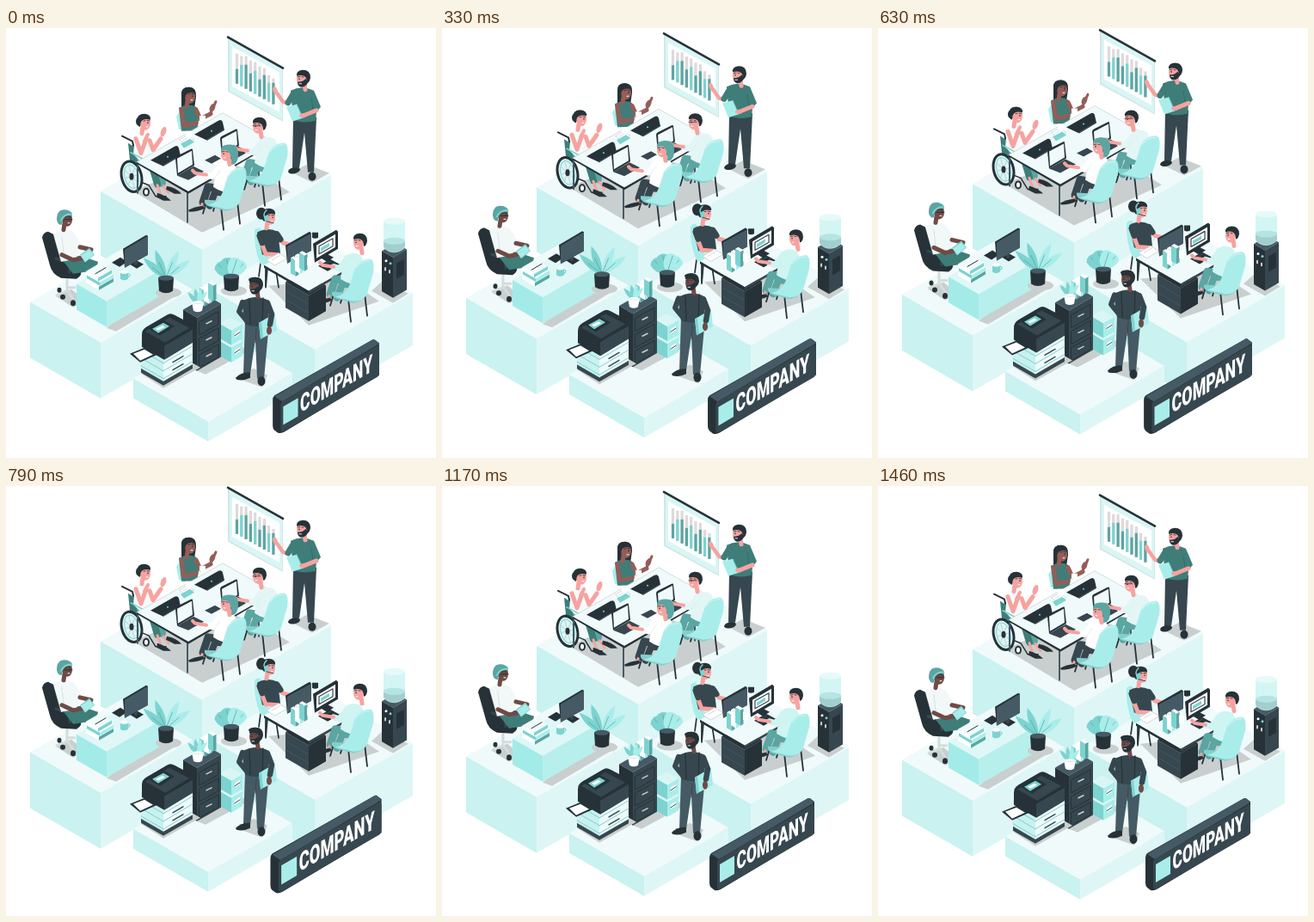
Recreate the animation shown at these times as an HTML page. Size 500 by 500 pixels, loop 1500 ms.

```html
<!DOCTYPE html>
<html lang="en">
<head>
<meta charset="utf-8">
<title>Isometric office</title>
<style>
html, body { margin: 0; width: 100%; height: 100%; overflow: hidden; background: #fff; }
svg { display: block; width: 100vw; height: 100vh; }
text { font: 900 28px Roboto, sans-serif; fill: #fff; }
</style>
</head>
<body>
<svg viewBox="0 0 500 500"><g id="office"></g><g id="sign"></g></svg>
<script>
const dark = '#263238', slate = '#37474f', grey = '#455a64', aqua = '#a9edeb', teal = '#7cd3d0',
  deep = '#5ba5a2', green = '#3f7d79', pale = '#d9f6f5', mist = '#f0fafa', white = '#fff',
  pink = '#f6a3a0', brown = '#955d58', umber = '#704a46', shade = '#c9cfcf';

const fill = (color, d) => `<path fill="${color}" d="${d}"/>`;
const line = (color, width, d, cap = 'round') =>
  `<path fill="none" stroke="${color}" stroke-width="${width}" stroke-linecap="${cap}" stroke-linejoin="round" d="${d}"/>`;
const oval = (color, x, y, rx, ry = rx, turn = 0) =>
  `<ellipse fill="${color}" rx="${rx}" ry="${ry}" transform="translate(${x} ${y}) rotate(${turn})"/>`;
const at = (x, y, content, flip = 1) => `<g transform="translate(${x} ${y}) scale(${flip} 1)">${content}</g>`;
const fan = (turns, draw) => turns.map((turn, i) => `<g transform="rotate(${turn})">${draw(i)}</g>`).join('');

// Isometric box: (x, y) is the front corner of its top, a and b reach left and right.
function box(x, y, a, b, h, [top, left, right]) {
  const k = 0.577, l = y - a * k, r = y - b * k;
  return fill(top, `M${x} ${y}L${x - a} ${l} ${x + b - a} ${l - b * k} ${x + b} ${r}Z`) +
    fill(left, `M${x} ${y}L${x - a} ${l}v${h}L${x} ${y + h}Z`) +
    fill(right, `M${x} ${y}L${x + b} ${r}v${h}L${x} ${y + h}Z`);
}

const blockColors = [mist, '#c9f2f0', '#def7f6'], darkBox = [grey, dark, slate];

// Head looking left; flip = -1 looks right.
const head = (x, y, skin, hair, flip = 1, extra = '') => at(x, y,
  line(skin, 5, 'M2 5L3 12') + oval(skin, -1, 0, 6, 8) +
  fill(hair, 'M-7 -4Q-8 -10 0 -11Q9 -11 9 -2Q8 4 5 4Q5 -1 3 -3Q0 -6 -7 -4Z') +
  oval(dark, -4, -.5, .8) + line(dark, .8, 'M-6 -2.8l3 -.4M-1 -3l2 .3') + line(white, 1, 'M-4 4h2'), flip) +
  at(x, y, extra, flip);

const beard = fill(dark, 'M-6 3Q-3 3 0 2L4 -1 6 4Q3 9 -2 9Q-6 8 -6 3Z') + line(white, .9, 'M-4 5h2.5');

const chair = line(dark, 1.8, 'M233 203L229 216M250 208L253 235M269 202L272 228M243 206L241 213') +
  fill('#84cfcd', 'M231 200Q230 206 237 208L256 213Q268 211 271 202Z') +
  fill(aqua, 'M258 172Q265 161 276 162Q281 164 279 178L272 202Q268 211 256 211L235 206Q248 203 252 191Z') +
  line('#c9f5f3', 1.2, 'M259 172Q266 163 275 164');

// A person seated at the right of a table, looking left, with the chair in front.
const seated = (dx, dy, shirt, trousers, face) => at(dx, dy,
  line(trousers, 9, 'M254 188L235 185L229 203') + line(trousers, 8, 'M257 192L243 191L237 207') +
  line(pink, 3, 'M228 205L227 210') +
  fill(dark, 'M212 212Q219 208 229 207L231 210Q223 214 213 214Z') +
  fill(shirt, 'M245 160Q253 152 264 157Q270 164 267 178L263 192Q251 192 241 185Z') +
  line(shirt, 7, 'M247 164L240 173L233 171') + line(pink, 4, 'M233 171L220 169L217 166') +
  line('#dcebeb', .8, 'M249 166L242 176')) + face + at(dx, dy, chair);

const openLaptop = fill(slate, 'M199 172L218 161 230 167 212 177Z') +
  fill(dark, 'M197 152Q197 150 199 149L215 141Q217 140 217 142L219 160 199 172Z') +
  fill(mist, 'M199 152L216 143 217 159 200 169Z');
const laptopLid = fill(dark, 'M168 154L196 138Q200 136 201 140L203 149 183 161Z') +
  line(grey, 1, 'M183 160L202 149') + oval(teal, 188, 150, 1);

function chart() {
  const tall = [35, 35, 38, 36, 37, 35, 36, 31, 30], low = [17, 25, 28, 21, 27, 20, 28, 22, 25];
  let bars = '';
  tall.forEach((h, i) => {
    const foot = `M${268.5 + 5.3 * i} ${65 + 3 * i}v-`;
    bars += line('#dfd9da', 3.2, foot + h, 'butt') + line(i % 3 == 1 ? teal : deep, 3.2, foot + low[i], 'butt');
  });
  return fill('#d0e7e7', 'M258 12L322 48V109L258 74Z') + fill(pale, 'M260 14L321 48V107L260 73Z') +
    fill(white, 'M263 22L318 52V98L263 68Z') + bars + line(dark, 2.6, 'M258 11L322 47');
}

const presenter = fill(shade, 'M332 168L356 180 376 169 350 159Z') +
  fill(slate, 'M334 104H361L358 168H351L347 122 341 163H333Z') +
  oval(dark, 335, 166, 7, 3.5, -12) + oval(dark, 356, 173, 4.5, 5) +
  line(pink, 4.5, 'M328 88L322 86L315 76') + oval(pink, 313, 73, 2.5, 4.5, -20) +
  line(green, 7, 'M334 77L328 87') +
  fill(green, 'M331 73Q344 66 358 73L366 92 361 98 360 108Q346 112 334 107Z') +
  line(pink, 5, 'M361 96L346 102') + line('#356b68', 1, 'M355 82L357 94') +
  fill(aqua, 'M326 92L338 89 345 105 333 109Z') + line(teal, 1, 'M338 89L345 105') + oval(pink, 345, 102, 4, 2.5) +
  head(345, 60, pink, dark, 1, beard);

const talker = fill(aqua, 'M198 103L204 94 208 120 201 118Z') +
  fill(dark, 'M204 78Q203 69 213 69Q222 70 221 80L219 94 204 96Z') +
  fill(green, 'M201 93Q212 87 221 92L224 108 222 120H204Z') +
  line(brown, 5, 'M221 95L226 106L238 100') + line(brown, 3, 'M238 99L244 86') + oval(brown, 240, 93, 3, 5, 25) +
  line(brown, 5, 'M204 95L207 114L221 111') + head(213, 80, brown, dark, -1);

const wheelchairUser = line(dark, 2, 'M135 126L147 132L153 160') + fill(green, 'M142 134L153 141 156 160 144 154Z') +
  line(deep, 10, 'M157 152L176 160L181 180') + line(green, 8, 'M161 157L170 162L176 182') +
  line(pink, 3, 'M183 184L189 192M176 183L180 194') +
  fill(dark, 'M187 184Q198 186 204 193L196 193 186 188ZM176 192Q186 195 192 201L183 201 175 197Z') +
  line(dark, 1.5, 'M153 178L166 183L174 196L186 196') + oval(dark, 163, 191, 4, 5) + oval(white, 163, 191, 2, 3) +
  fill('#f5fafa', 'M150 126Q160 120 168 126L170 150 156 155 148 147Z') +
  line(pink, 5, 'M151 129L157 146L163 129M167 131L171 142L180 129') + oval(pink, 183, 121, 3, 6, 20) +
  oval(dark, 155, 109, 4, 5) + head(161, 111, pink, dark, -1) + line(pink, 4, 'M161 132L165 124') +
  `<g fill="none" stroke="${dark}" transform="translate(146 173) rotate(-14)"><ellipse fill="${pale}" stroke-width="3" rx="11.5" ry="18"/>
  <ellipse stroke="${teal}" rx="8" ry="14"/><path stroke="${shade}" d="M-8 0H8M0 -14V14M-6 -9L6 9M6 -9L-6 9"/></g>` +
  oval(dark, 146, 173, 2.5, 4) + line(teal, 1.5, 'M145 145L160 153');

const table = line(grey, 2, 'M153 158V192M211 192V226M294 150V184') +
  fill(dark, 'M152 156L212 190 311 133V135L212 193 152 158Z') +
  fill(mist, 'M152 156L252 99L312 133 212 190Z') + line(shade, .7, 'M152 156L252 99L312 133') +
  laptopLid + at(51, -30, laptopLid) +
  fill(white, 'M202 130L211 125 219 130 209 136ZM232 153L243 147 254 153 244 160Z') +
  line(shade, .7, 'M202 130L211 125L219 130L209 136ZM206 131l8 -5') +
  fill(teal, 'M203 135L214 129 219 133 207 140Z') + fill(white, 'M209 120h7v7q-4 2 -7 0ZM225 102h7v6q-4 2 -7 0Z') +
  fill(slate, 'M231 154L243 148 250 152 239 158Z') +
  at(52, -23, openLaptop);

const meeting = chart() + presenter + talker +
  fill(shade, 'M148 190L228 238 330 191 300 172 240 150Z') + wheelchairUser + table +
  seated(48, -28, '#e2f6f5', deep, head(294, 115, pink, dark, 1, line(dark, .8, 'M-7 -1h9'))) + openLaptop +
  seated(0, 0, white, slate, head(257, 147, pink, deep, 1, fill(deep, 'M0 -11Q14 -13 13 2Q12 13 5 12Q6 2 1 -4Z')));

const longLeaf = 'M0 0Q-8 -17 2 -35Q9 -16 0 0Z', roundLeaf = 'M0 0Q-11 -6 -7 -20Q-1 -25 6 -20Q9 -7 0 0Z';
const plant = (x, y, leaf, turns) => oval(shade, x + 3, y + 17, 15, 6) + at(x, y,
  fan(turns, i => fill(i % 2 ? aqua : teal, leaf) + line(deep, .7, 'M0 0V-20')) +
  fill(dark, 'M-9 0Q0 -5 9 0L8 15Q0 20 -8 15Z') + oval(grey, 0, 0, 9, 3));

const books = (x, y) => [0, 1, 2].map(i =>
  box(x + i * 5, y - i * 3, 6, 3.5, 18, [white, i % 2 ? white : teal, i % 2 ? aqua : deep])).join('');

const manager = fill(shade, 'M58 312L78 325 92 317 76 304ZM117 349L128 353 202 309 181 297Z') +
  line('#d5dcdc', 3, 'M71 289V306L59 311M71 305L79 317M71 302L80 302') +
  oval(dark, 62, 305, 2.5, 3) + oval(dark, 66, 313, 3) + oval(dark, 78, 320, 3, 3.5) +
  fill(dark, 'M42 244Q43 238 49 237L57 241 66 272 86 281Q90 287 82 292L64 291Q53 286 51 276Z') +
  line(grey, 1, 'M56 243L64 272') + line(slate, 3, 'M58 268L74 274V284') +
  fill(green, 'M64 268L86 265 107 272Q106 281 92 284L78 286Z') +
  fill('#f2f7f7', 'M55 240Q67 231 79 238L89 255 81 269 64 272Z') + line('#d6e4e4', 1, 'M65 243L67 262') +
  line(umber, 5, 'M65 264L78 270L88 268M86 255L99 258') +
  fill(teal, 'M86 264L97 256 103 264 92 273Z') + fill(aqua, 'M87 265L97 258 102 264 92 272Z') +
  head(70, 223, umber, deep, -1, fill(deep, 'M-2 -11Q11 -14 11 0Q10 7 5 6Q5 -2 0 -5Z') +
    line(teal, 2, 'M-6 -6Q2 -7 6 1') + line(dark, 1, 'M-7 0h9')) +
  box(117, 318, 35, 64, 30, ['#dff7f6', '#a3ebe8', '#b7efed']) +
  box(108, 301, 15, 17, 4, [white, white, deep]) + box(109, 296, 15, 16, 4, [white, teal, aqua]) +
  box(107, 291, 14, 16, 4, [mist, white, teal]) + line(dark, 1, 'M104 286L116 279') +
  fill(teal, 'M133 284h9v8q-5 3 -9 0Z') + oval(white, 137.5, 284, 4.5, 2) + line(teal, 1.2, 'M142 286q4 1 0 4') +
  fill(dark, 'M123 273L133 267 141 272 132 278ZM144 275L151 270 160 275 152 280Z') + line(slate, 4, 'M151 265V274') +
  fill(dark, 'M136 257L163 241 165 242V264L138 279Z') + fill(grey, 'M138 258L165 242V264L138 279Z') +
  plant(186, 291, longLeaf, [-52, 50, -24, 22]);

const cooler = fill(shade, 'M425 306L450 320 468 309 437 295Z') + box(450, 267, 13, 16, 47, [grey, dark, slate]) +
  fill('#a9d5d4', 'M440 250V257Q451 266 463 257V250Z') +
  fill('#d3f6f4', 'M439 226Q451 218 464 226V254Q451 264 439 254Z') +
  fill('#a2cecd', 'M439 248Q451 255 464 248V255Q451 265 439 255Z') +
  oval('#b5e5e3', 451.5, 248, 12.5, 4) + oval('#e6faf9', 451.5, 225, 12.5, 4) +
  oval(white, 442, 271, 1.5) + oval(teal, 447, 274, 1.5) + line(white, 1.5, 'M441 279v3M446 282v3') + fill(dark, 'M454 274L463 269V287L454 292Z');

const operator = line(dark, 1.7, 'M296 274L294 289M304 279L302 302M313 276L317 302') +
  fill(aqua, 'M289 235Q296 228 299 240L304 266 320 272 310 279 296 275Q288 258 289 235Z') +
  fill(slate, 'M292 238Q304 231 316 237L319 262 298 264Z') +
  line(pink, 5, 'M295 245L302 263L316 264M316 241L322 250L336 254') + line(slate, 7, 'M295 242L298 250M315 240L319 246') +
  oval(dark, 297, 216, 6, 7) + head(306, 221, pink, dark, -1, line(teal, 1.5, 'M3 -9Q9 -4 3 3') + oval(teal, 3, 1, 2.5, 4) + line(dark, .8, 'M3 4L-5 6'));

const workstation = fill(shade, 'M305 300L352 346 434 318 395 292Z') + operator +
  line(dark, 1.8, 'M302 280V300M403 279V305') +
  box(352, 311, 27, 20, 30, [dark, slate, dark]) + line(grey, .8, 'M327 307L351 321M327 317L351 331') +
  box(352, 306, 52, 53, 3, [mist, dark, slate]) +
  fill(white, 'M303 270L317 262 327 268 313 276Z') + line(shade, .8, 'M303 270L317 262L327 268L313 276ZM309 270l9 -5') +
  line(slate, 4, 'M341 264V270M373 258V266') + fill(dark, 'M334 271L342 267 350 271 342 276ZM365 267L373 263 381 267 373 272Z') +
  fill(dark, 'M325 253L353 237 355 239V259L327 274Z') + fill(grey, 'M327 254L355 239V259L327 274Z') +
  fill(dark, 'M357 251L384 235 386 237V257L359 273Z') + fill(white, 'M361 253L383 240V255L361 268Z') +
  line(slate, 1.2, 'M364 254L380 245V254L364 263Z') + fill(teal, 'M366 256L376 250V254L366 260Z') +
  fill(dark, 'M356 238h7v6q-4 2 -7 0Z') + books(337, 271) +
  fill(white, 'M350 267h6v9q-3 2 -6 0Z') + fill(dark, 'M363 277L377 269 388 275 374 283Z') + line(grey, .8, 'M367 277L378 271M371 280L382 273') +
  seated(148, 107, '#cff5f3', deep, head(411, 250, pink, dark)) + cooler +
  plant(262, 289, roundLeaf, [-48, 44, -16, 18]);

const cabinet = fill(shade, 'M222 399L232 403 282 376 268 366Z') +
  box(262, 372, 14, 13, 17, [pale, teal, aqua]) + box(262, 352, 14, 13, 17, [pale, teal, aqua]) +
  fill(white, 'M266 355L272 351V356L266 360ZM266 375L272 371V376L266 380Z') + line(slate, 1, 'M266 358l6 -4M266 378l6 -4') +
  box(222, 337, 16, 28, 62, darkBox) +
  [0, 1, 2].map(i => at(0, i * 19, line(dark, 1, 'M225 342L247 330V345L225 357Z') + line(shade, 1.5, 'M233 344L239 341'))).join('') +
  books(231, 306) + at(223, 321, fan([-40, 36, -10, 12], i => fill(i % 2 ? aqua : teal, 'M0 0Q-5 -9 0 -18Q5 -9 0 0Z')) +
    fill(white, 'M-7 -2Q0 -5 7 -2L5 8Q0 11 -5 8Z') + line(shade, .6, 'M-7 -2Q0 2 7 -2'));

const printer = fill(shade, 'M157 402L183 419 226 395 200 380Z') +
  box(183, 411, 26, 34, 5, [grey, slate, slate]) + box(183, 379, 26, 34, 32, [pale, '#c8f1ef', '#effafa']) +
  [0, 1, 2].map(i => at(0, i * 9, line(teal, 1, 'M183 390L217 370M157 375L183 390') + line(slate, 1.4, 'M194 389L206 382'))).join('') +
  fill(dark, 'M158 357Q158 351 163 348L187 334Q191 331 196 334L213 343Q217 345 217 350V366L184 386 158 371Z') +
  fill(slate, 'M184 370L217 351V366L184 386Z') + fill(slate, 'M162 353L190 337 213 349 185 366Z') +
  fill(dark, 'M166 350L183 340 196 347 179 358Z') + fill(teal, 'M170 350L183 343 190 347 177 355Z') + fill(white, 'M174 350L182 346 185 348 177 352Z') +
  fill(dark, 'M144 379L161 372 176 380 156 389Z') + fill(white, 'M148 379L161 374 171 380 156 387Z');

const stander = fill(shade, 'M267 407L298 418 304 404 288 396Z') +
  fill(grey, 'M278 342H306L300 408H292L290 362 284 403H276Z') + line(slate, 1, 'M291 350L290 366') +
  fill(dark, 'M267 407Q274 400 284 401V407Q276 411 268 409Z') + oval(dark, 297, 411, 4.5, 5.5) +
  line(slate, 6, 'M275 319L271 330L280 341') +
  fill(slate, 'M274 318Q290 309 305 317L306 345Q292 350 278 345Z') +
  line(dark, 1.2, 'M283 315L284 345M299 314L298 345') +
  fill(aqua, 'M294 343L313 332 315 352 296 362Z') + fill(teal, 'M294 343L297 342 299 360 296 362Z') +
  line(slate, 6.5, 'M304 320L309 333L307 345') + oval(umber, 306, 352, 3, 5) +
  head(290, 301, umber, dark, 1, beard) + oval(dark, 289, 293, 7, 3);

const officeGroup = document.getElementById('office'), signGroup = document.getElementById('sign');

officeGroup.innerHTML =
  box(228, 258, 118, 150, 75, blockColors) + meeting +
  box(110, 366, 82, 107, 65, blockColors) + manager +
  box(359, 374, 121, 114, 61, blockColors) + workstation +
  box(235, 458, 87, 98, 23, blockColors) + cabinet + printer + stander;

signGroup.innerHTML =
  fill(dark, 'M311 432Q311 429 313 427L424 364Q427 362 429 364L433 367V404L324 469Q320 471 317 470L313 467Q311 465 311 462Z') +
  fill(grey, 'M313 428L424 364Q427 362 429 364L433 368 322 434Z') +
  fill(slate, 'M322 434L430 371Q433 369 433 373V401Q433 404 431 406L324 468Q320 470 320 466V438Q320 435 322 434Z') +
  fill(aqua, 'M323 440L340 430V451L323 461Z') +
  '<text transform="matrix(.62 -.358 0 1 342.5 447)">COMPANY</text>';

const LOOP = 1500, STEPS = 36;
function draw(now) {
  const step = Math.floor((now % LOOP + 4) * STEPS / LOOP) % STEPS;
  const p = (step + 0.5) / STEPS;
  const lift = 10 * (1 - Math.abs(1 - 2 * p));
  const beat = Math.max(0, Math.min(p / 0.1, (0.3 - p) / 0.2), 1 - Math.abs(p - 0.5) / 0.1);
  officeGroup.setAttribute('transform', `translate(0 ${-lift})`);
  signGroup.setAttribute('transform', `translate(372 417) scale(${1 + 0.1 * beat}) translate(-372 -417)`);
}
const start = performance.now();
function tick() {
  draw(performance.now() - start);
  requestAnimationFrame(tick);
}
tick();
</script>
</body>
</html>
```
